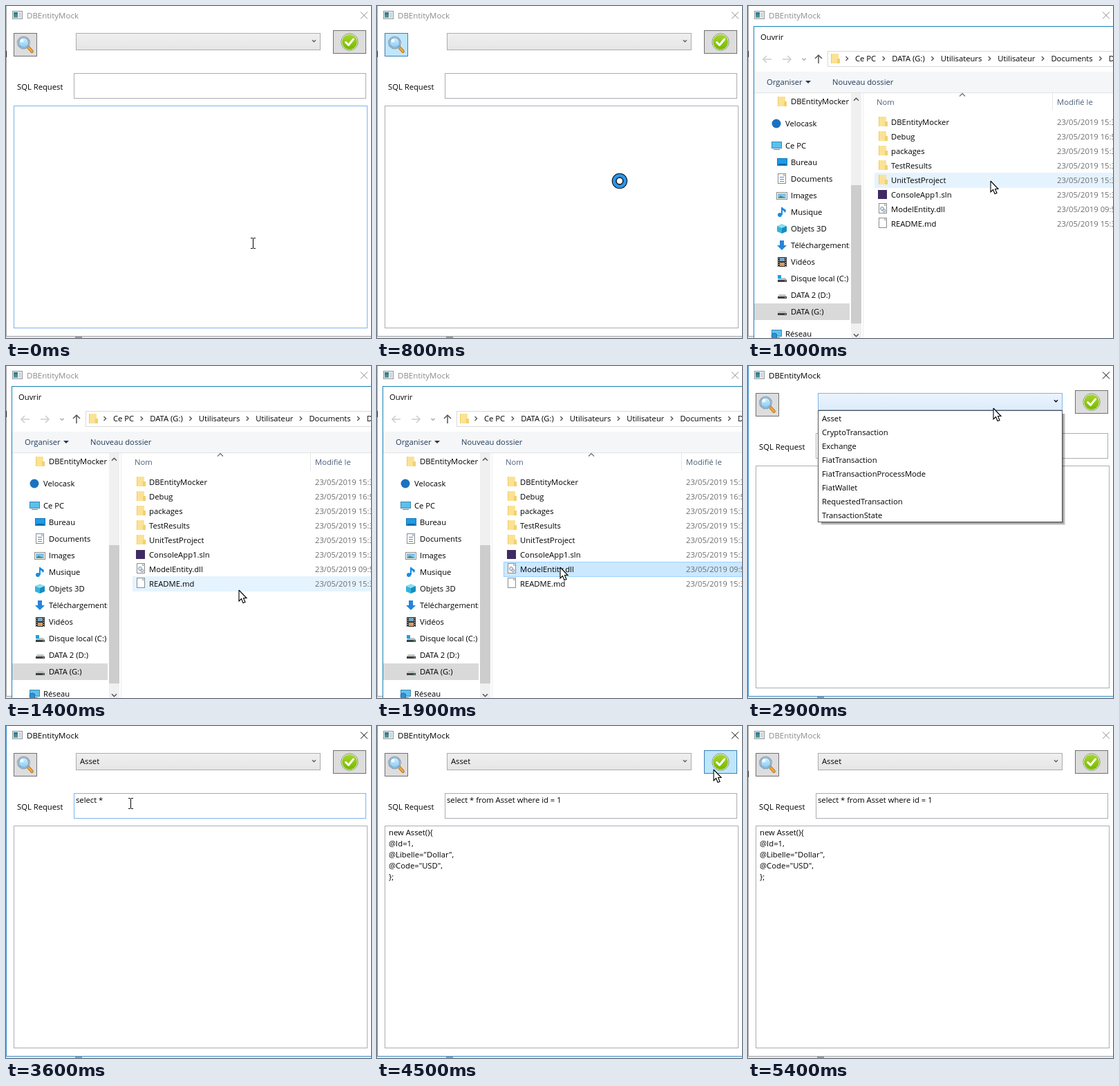
An HTML page with a canvas that plays this animation: 528x480 px, repeating every 5500 ms.

```html
<!DOCTYPE html>
<html lang="fr">
<head>
<meta charset="utf-8">
<title>DBEntityMock</title>
<style>
html, body { margin: 0; width: 528px; height: 480px; overflow: hidden; background: #fff; }
canvas { display: block; }
</style>
</head>
<body>
<canvas width="528" height="480"></canvas>
<script>
const c = document.querySelector('canvas').getContext('2d');
const LOOP = 5500, MOVE = 300, QUERY = 'select * from Asset where id = 1';
const ENTITIES = ['Asset', 'CryptoTransaction', 'Exchange', 'FiatTransaction',
  'FiatTransactionProcessMode', 'FiatWallet', 'RequestedTransaction', 'TransactionState'];
const RESULT = ['new Asset(){', '@Id=1,', '@Libelle="Dollar",', '@Code="USD",', '};'];
const FILES = ['DBEntityMocker', 'Debug', 'packages', 'TestResults', 'UnitTestProject',
  'ConsoleApp1.sln', 'ModelEntity.dll', 'README.md'];
const FILE_ICONS = { sln: 'solution', dll: 'library', md: 'page' };
const FILE_HOURS = { 'Debug': '16:58', 'ModelEntity.dll': '09:56' };
const CRUMBS = ['Ce PC', 'DATA (G:)', 'Utilisateurs', 'Utilisateur', 'Documents', 'Dev'];
const ROOTS = ['Velocask', 'Ce PC', 'Réseau'];
const TREE = {
  'DBEntityMocker': 'folder', 'Velocask': 'cloud', 'Ce PC': 'pc', 'Bureau': 'desktop',
  'Documents': 'lines', 'Images': 'image', 'Musique': 'note', 'Objets 3D': 'cube',
  'Téléchargements': 'down', 'Vidéos': 'film', 'Disque local (C:)': 'system',
  'DATA 2 (D:)': 'disk', 'DATA (G:)': 'disk', 'Réseau': 'network' };
// Places where the pointer rests, with its time of arrival.
const STOPS = [
  { at: 0, x: 357, y: 343 }, { at: 400, x: 28, y: 56 }, { at: 800, x: 351, y: 253 },
  { at: 1400, x: 337, y: 324 }, { at: 1800, x: 265, y: 291 }, { at: 2500, x: 355, y: 61 },
  { at: 3200, x: 135, y: 77 }, { at: 3500, x: 180, y: 112 }, { at: 4200, x: 487, y: 63 },
  { at: 5200, x: 560, y: 205 }];

function rect(x, y, w, h, fill, stroke) {
  if (fill) { c.fillStyle = fill; c.fillRect(x, y, w, h); }
  if (stroke) { c.strokeStyle = stroke; c.lineWidth = 1; c.strokeRect(x + .5, y + .5, w - 1, h - 1); }
}
function text(s, x, y, color = '#000', size = 11.25) {
  c.font = size + 'px "Open Sans", "Noto Sans", sans-serif';
  c.fillStyle = color;
  c.fillText(s, x, y);
}
function trace(p) {
  c.beginPath();
  for (let i = 0; i < p.length; i += 2) c.lineTo(p[i], p[i + 1]);
}
function line(color, width, ...p) { trace(p); c.strokeStyle = color; c.lineWidth = width; c.stroke(); }
function poly(fill, ...p) { trace(p); c.fillStyle = fill; c.fill(); }
function disc(x, y, r, fill, stroke, width = 1) {
  c.beginPath(); c.arc(x, y, r, 0, 7);
  if (fill) { c.fillStyle = fill; c.fill(); }
  if (stroke) { c.strokeStyle = stroke; c.lineWidth = width; c.stroke(); }
}
function fade(y0, y1, a, b) {
  const g = c.createLinearGradient(0, y0, 0, y1);
  g.addColorStop(0, a); g.addColorStop(1, b);
  return g;
}
// Runs a drawing around a place, turned by a number of quarter turns.
function place(x, y, paint, turn = 0) {
  c.save(); c.translate(x, y); c.rotate(turn * Math.PI / 2); paint(); c.restore();
}
function chevron(x, y, color, turn = 0, r = 2.5) {
  place(x, y, () => line(color, 1.4, -r, -r / 2, 0, r / 2, r, -r / 2), turn);
}
function arrow(x, y, color, turn) {
  place(x, y, () => { line(color, 1.5, 0, 6, 0, -6); line(color, 1.5, -5, -1, 0, -6, 5, -1); }, turn);
}

// Icons are drawn around their centre.
const icons = {
  folder() { rect(-6, -7, 11, 14, '#fbe294'); rect(-6, -7, 1, 14, '#efcb62'); rect(3, 0, 4, 7, '#f3d06d'); },
  page() { rect(-6, -8, 12, 15, '#fff', '#8c8c8c'); poly('#bbb', 2, -8, 6, -4, 2, -4); },
  library() { icons.page(); disc(-1, 0, 2.5, '#dde7ef', '#8298ab'); disc(2, 3, 2, '#dde7ef', '#8298ab'); },
  lines() { icons.page(); for (const y of [-3, 0, 3]) rect(-3, y, 6, 1, '#4a86c5'); },
  solution() { rect(-7, -6, 13, 13, '#3f2a63'); },
  cloud() { disc(0, 0, 6.5, '#1b72c0'); },
  pc() { rect(-7, -6, 15, 10, '#5bc0ee', '#3d87ad'); rect(-4, 5, 9, 1, '#3d87ad'); },
  desktop() { rect(-7, -6, 15, 11, '#1e9be8', '#1878b8'); rect(-5, 2, 11, 2, '#0e68a8'); },
  image() { rect(-8, -5, 16, 11, '#fff', '#8a8a8a'); rect(-6, -3, 12, 7, '#7fc4f0'); poly('#4f8f75', -6, 4, -2, 0, 6, 4); },
  note() { disc(-3, 4, 3, '#1a8be0'); rect(-1, -7, 2, 11, '#1a8be0'); poly('#1a8be0', 0, -7, 6, -3, 5, 1, 1, -3); },
  cube() {
    poly('#8adcf2', 0, -7, 7, -4, 0, -1, -7, -4);
    poly('#35b3dc', -7, -4, 0, -1, 0, 7, -7, 4);
    poly('#168fbd', 7, -4, 0, -1, 0, 7, 7, 4);
  },
  down() { rect(-3, -7, 6, 8, '#2385dc'); poly('#2385dc', -7, 0, 7, 0, 0, 7); },
  film() {
    rect(-6, -7, 13, 14, '#333'); rect(-3, -6, 7, 5, '#72a6c8'); rect(-3, 1, 7, 5, '#d89d59');
    for (let y = -6; y < 7; y += 3) for (const x of [-5, 5]) rect(x, y, 1, 1, '#fff');
  },
  disk() { poly('#bfc3c6', -4, -1, 5, -1, 7, 2, -6, 2); rect(-6, 2, 13, 3, '#3d4043'); rect(4, 3, 2, 1, '#6ee06e'); },
  system() { icons.disk(); rect(-6, -5, 5, 5, '#17a3e3'); },
  network() { icons.pc(); disc(-3, 3, 4, '#2d91d2', '#1c6fa8'); }
};

function pointerAt(t) {
  const i = STOPS.findLastIndex(s => s.at <= t), a = STOPS[i], b = STOPS[i + 1];
  if (!b) return null;
  let k = Math.max(0, 1 - (b.at - t) / MOVE);
  k *= k * (3 - 2 * k);
  return { x: Math.round(a.x + (b.x - a.x) * k), y: Math.round(a.y + (b.y - a.y) * k) };
}

function button(x, y, w, hot) { rect(x, y, w, 34, hot ? '#bee6fd' : '#ddd', hot ? '#3c7fb1' : '#707070'); }
function field(x, y, w, h, hot) { rect(x, y, w, h, '#fff', hot ? '#7eb4ea' : '#abadb3'); }

function magnifier(x, y) {
  c.lineCap = 'round';
  line('#b06a14', 4.5, x + 7, y + 7, x + 12, y + 12.5);
  line('#f3a83a', 2.8, x + 7, y + 7, x + 12, y + 12.5);
  c.lineCap = 'butt';
  disc(x, y, 8, fade(y - 8, y + 8, '#d9f1ff', '#82c8f4'), '#6b8ca8', 2.6);
  disc(x, y, 8, null, '#c8d8e4');
  disc(x - 2.5, y - 3, 2.5, '#f3fbff');
}

function tick(x, y) {
  disc(x, y, 12.2, '#eef3e6', '#8a9a70');
  disc(x, y, 10.8, fade(y - 11, y + 11, '#a9d62c', '#76b900'));
  c.lineCap = c.lineJoin = 'round';
  line('#fff', 3, x - 5.5, y + .5, x - 1.5, y + 4.5, x + 5.5, y - 4);
  c.lineCap = 'butt'; c.lineJoin = 'miter';
}

function mainWindow(t, active, hot) {
  rect(0, 0, 528, 480, '#fff');
  const edge = active ? '#3c93cf' : '#a5a5a5', ink = active ? '#000' : '#8b8b8b';
  rect(0, 478, 528, 2, '#e9e9e9');
  rect(0, 0, 1, 478, edge);
  rect(0, 477, 528, 1, edge);
  rect(100, 478, 10, 2, '#fff', '#999');
  if (!active) rect(0, 65, 1, 9, '#222');

  rect(9, 7, 15, 12, '#f4f4f4', '#8d9499');
  rect(11, 9, 6, 8, fade(9, 17, '#2f6f8d', '#4fa794'));
  rect(18, 9, 4, 8, '#d0d7dc');
  text('DBEntityMock', 30, 18, ink, 11.5);
  line(ink, 1, 513, 8.5, 523, 18.5);
  line(ink, 1, 523, 8.5, 513, 18.5);

  button(11, 39, 34, hot.browse);
  magnifier(25.5, 53);
  rect(101, 39, 354, 25, hot.combo ? fade(39, 64, '#ecf4fc', '#dcecfc') : fade(39, 64, '#f0f0f0', '#e5e5e5'),
    hot.combo ? '#7eb4ea' : '#acacac');
  chevron(445.5, 50.5, hot.combo ? '#000' : '#606060');
  if (t >= 3300) text(ENTITIES[0], 107, 55);
  button(473, 35, 48, hot.run);
  tick(497, 52);

  text('SQL Request', 16, 121);
  field(98, 97, 423, 37, hot.query);
  const typed = Math.round(QUERY.length * Math.min(1, Math.max(0, (t - 3500) / 400)));
  text(QUERY.slice(0, typed), 101, 111);
  field(11, 144, 512, 322, hot.result);
  if (t >= 4500) RESULT.forEach((s, i) => text(s, 17, 158 + 16 * i));
}

function dropdown(p) {
  for (let i = 0; i < 4; i++) rect(106, 69, 350 + i, 158 + i, 'rgba(0,0,0,.13)');
  rect(101, 64, 354, 162, '#fff', '#555');
  ENTITIES.forEach((s, i) => {
    const y = 66 + 20 * i;
    if (p.y >= y && p.y < y + 20) rect(103, y, 350, 20, '#cbe6fb', '#6cb5ec');
    text(s, 107, y + 14);
  });
}

function folderTree() {
  c.save();
  c.beginPath(); c.rect(9, 126, 138, 354); c.clip();
  let y = 138;
  for (const [s, name] of Object.entries(TREE)) {
    const root = ROOTS.includes(s), x = root ? 54 : 62;
    if (y > 138 || root) y += root ? 32 : 24;
    if (s == 'DATA (G:)') rect(9, y - 12, 139, 24, '#d9d9d9');
    place(x - 13, y, icons[name]);
    text(s, x, y + 4);
  }
  c.restore();
  rect(149, 126, 15, 354, '#f0f0f0');
  rect(149, 259, 15, 200, '#cdcdcd');
  chevron(156.5, 135, '#505050', 2, 3.5);
  chevron(156.5, 476, '#505050', 0, 3.5);
  rect(166, 126, 1, 354, '#ececec');
}

function fileList(t, p) {
  text('Nom', 186, 143, '#4c607a');
  text('Modifié le', 447, 143, '#4c607a');
  chevron(310, 128.5, '#777', 2, 4);
  rect(440, 126, 1, 25, '#e5e5e5');
  FILES.forEach((s, i) => {
    const y = 157 + 21 * i;
    if (t >= 1900 && s == 'ModelEntity.dll') rect(183, y, 350, 22, '#cce8ff', '#99d1ff');
    else if (p.y >= y && p.y < y + 21) rect(183, y, 350, 22, '#e5f3ff');
    place(195, y + 10, icons[FILE_ICONS[s.split('.')[1]] || 'folder']);
    text(s, 207, y + 15);
    text('23/05/2019 ' + (FILE_HOURS[s] || '15:37'), 447, y + 15, '#6d6d6d');
  });
}

function dialog(t, p) {
  rect(8, 29, 530, 460, '#fff', '#1883b7');
  text('Ouvrir', 18, 49);

  arrow(28, 77, '#ccc', -1);
  arrow(56, 77, '#ccc', 1);
  chevron(81, 77, '#aaa');
  arrow(102, 77, '#555', 0);
  rect(115, 65, 420, 23, '#fff', '#d9d9d9');
  place(126, 76, icons.folder);
  let x = 155;
  for (const s of CRUMBS) {
    chevron(x - 12, 76, '#555', -1, 3);
    text(s, x, 80);
    x += c.measureText(s).width + 23;
  }

  rect(9, 95, 519, 30, '#f5f6f7');
  rect(9, 125, 519, 1, '#e1e3e5');
  text('Organiser', 27, 114, '#1e395b');
  poly('#1e395b', 83, 108, 91, 108, 87, 112);
  text('Nouveau dossier', 122, 114, '#1e395b');
  folderTree();
  fileList(t, p);
}

const cursors = {
  busy() { disc(0, 0, 8, null, '#111', 6.6); disc(0, 0, 8, null, '#2a97ee', 4.6); disc(0, 0, 4.7, '#fff', '#111'); },
  beam() {
    rect(0, -7, 1, 14, '#000');
    for (const y of [-8, 7]) for (const x of [-3, 1]) rect(x, y, 3, 1, '#000');
  },
  arrow() {
    const p = [0, 0, 0, 16, 3.5, 12.5, 6, 18.5, 9, 17.5, 6.5, 11.5, 11, 11.5, 0, 0];
    poly('#fff', ...p); line('#000', 1.1, ...p);
  }
};

function draw(now) {
  const t = Math.floor(now % LOOP / 100) * 100;
  const p = pointerAt(t), open = t >= 2600 && t < 3300, modal = t >= 600 && t < 2100;
  const inside = (x, y, w, h) => !!p && !modal && p.x >= x && p.x < x + w && p.y >= y && p.y < y + h;
  const hot = {
    browse: t >= 400 && t < 2500 || inside(11, 39, 34, 34),
    combo: open || inside(101, 39, 354, 25),
    run: inside(473, 35, 48, 34),
    query: !open && inside(98, 97, 423, 37),
    result: !open && inside(11, 144, 512, 322)
  };
  mainWindow(t, t >= 400 && t < 700 || t >= 2100 && t < 5300, hot);
  if (open) dropdown(p);
  if (t >= 1000 && t < 2100) dialog(t, p);
  const kind = t >= 600 && t < 1000 ? 'busy' : hot.query || hot.result ? 'beam' : 'arrow';
  if (p) place(p.x, p.y, cursors[kind]);
  requestAnimationFrame(draw);
}
requestAnimationFrame(draw);
</script>
</body>
</html>
```
